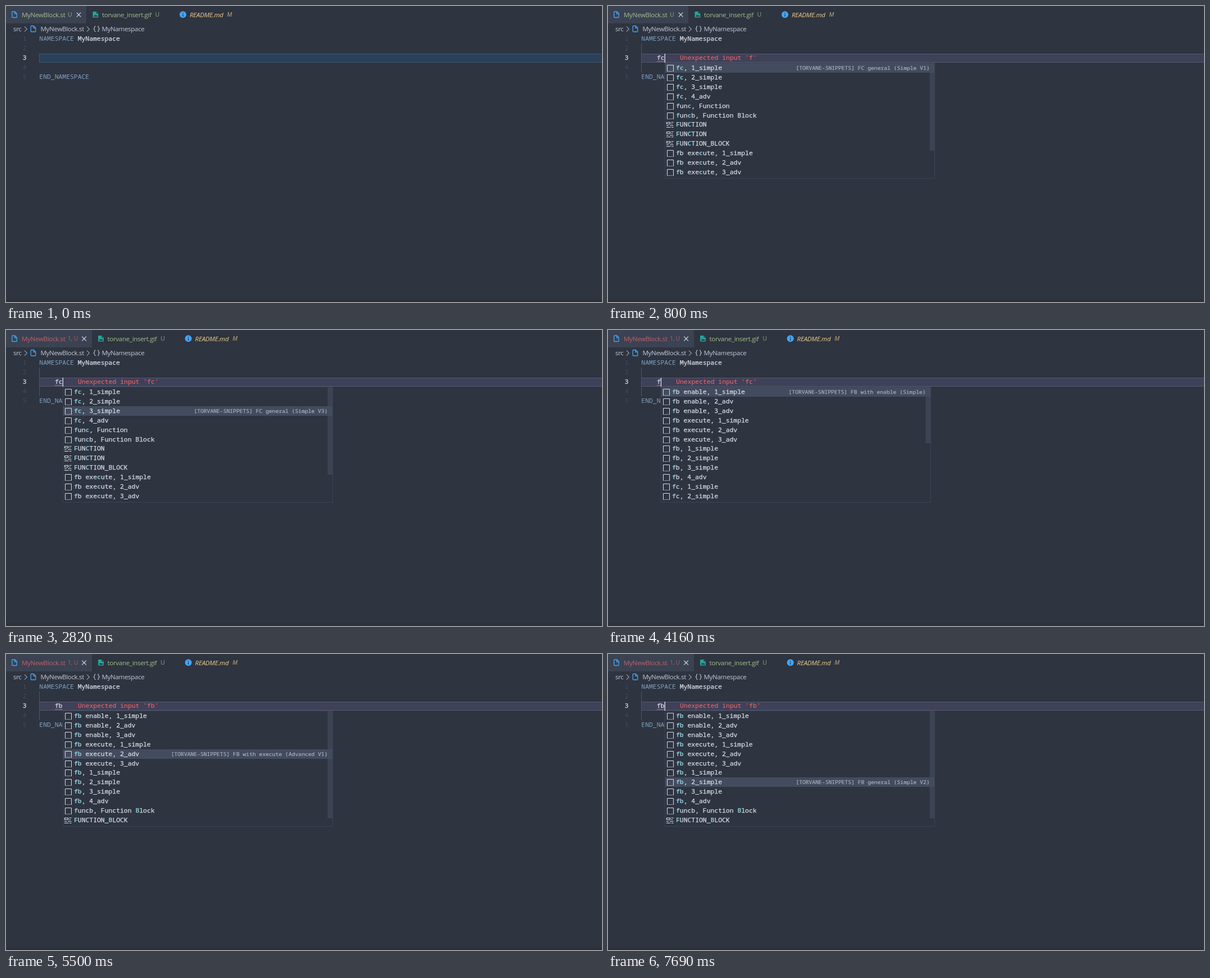
Animation, 1061 px wide and 528 px high, one loop 8 s. Source, as an HTML page:

```html
<!DOCTYPE html>
<html lang="en">
<head>
<meta charset="utf-8">
<title>Snippet completion</title>
<style>
  html, body { margin: 0; width: 100%; height: 100%; overflow: hidden; background: #2e3440; }
  svg { display: block; width: 1061px; height: 528px; }
  text { white-space: pre; }
  .ui { font: 11.55px "Open Sans", "Noto Sans", sans-serif; letter-spacing: -.33px; }
  .ui .badge { font-size: 10.6px; opacity: .82; }
  .code { font: 11.4px "Noto Sans Mono", "DejaVu Sans Mono", monospace; }
  .kw { fill: #81a1c1; }
  .plain, #rows { fill: #d8dee9; }
  .plain, #rows text { stroke: #d8dee9; stroke-width: .25; }
  .num { fill: #434c5e; text-anchor: end; }
  .num.plain { fill: #d8dee9; }
  .green { fill: #a3be8c; }
  .yellow { fill: #ebcb8b; font-style: italic; letter-spacing: -.22px; }
  .crumb { fill: #c3cad6; }
  .line { fill: none; stroke: #d8dee9; }
  #rows .hit { fill: #88c0d0; stroke: none; font-weight: 700; }
  #detail { font-size: 9.7px; fill: #a9b1bf; stroke: #a9b1bf; stroke-width: .2; text-anchor: end; }
  #message { fill: #ff6464; }
  .red #title, .red #status { fill: #bf616a; }
</style>
</head>
<body>
<svg viewBox="0 0 1061 528">
  <defs>
    <path id="file" d="M.7 1.5q0-1 1-1h4l3.6 3.6v5.9q0 1-1 1h-6.6q-1 0-1-1zM5.5.7v3.6h3.6" fill="none" stroke="#42a5f5" stroke-width="1.3"/>
    <path id="chevron" d="M0 0l4.4 4.5l-4.4 4.5" class="line"/>
    <g id="snippet" class="line">
      <path d="M1.8 11.5H.5V.5h11v11h-1.3"/>
      <path d="M3 11.5h6.5" stroke-dasharray="1.3 1"/>
    </g>
    <path id="keyword" class="line" stroke-width="1.2" d="M.5 1.5h6v3h-6zM8.500 1.500h4M8.500 4.500h2.500M0 7.500h4M6 7.500h6.500M0 10.500h7.500M9 10.500h3.500"/>
  </defs>
  <rect width="1061" height="528" fill="#2e3440"/>
  <rect y="523" width="1061" height="5" fill="#2b303b"/>

  <g class="ui" id="tabs">
    <rect id="active" width="143" height="31" fill="#3b4252"/>
    <use href="#file" x="10" y="9.5"/>
    <text id="title" class="green" x="28" y="19.7">MyNewBlock.st</text>
    <text id="status" class="green badge" x="110" y="19.4">U</text>
    <g id="rest">
      <path d="M125.7 11.7l7.6 7.6m0-7.6l-7.6 7.6" class="line" stroke-width="1.2"/>
      <path d="M154.5 10h6.5l3.3 3.3v7.2h-9.8z" fill="#26a69a"/>
      <path d="M160.7 10.3v3.3h3.4M156 19l2.4-3.4l1.7 1.9l1.3-1.4l2 2.9z" fill="#2e3440"/>
      <text class="green" x="171" y="19.7">torvane_insert.gif</text>
      <text class="green badge" x="265.6" y="19.4">U</text>
      <circle cx="315" cy="15.3" r="6" fill="#42a5f5"/>
      <path d="M315 12v1.4m0 1.3v4" stroke="#2e3440" stroke-width="1.3"/>
      <text class="yellow" x="327" y="19.7">README.md</text>
      <text class="yellow badge" x="393.6" y="19.4">M</text>
    </g>
  </g>

  <g class="ui crumb">
    <text x="13" y="45.3">src</text>
    <use href="#chevron" x="33" y="36.7"/>
    <use href="#file" x="43.5" y="35"/>
    <text x="61.5" y="45.3">MyNewBlock.st</text>
    <use href="#chevron" x="144" y="36.7"/>
    <path class="line" d="M159.5 36q-2 0-2 2v1.5q0 1.3-1.6 1.3q1.6 0 1.6 1.3v1.5q0 2 2 2M163 36q2 0 2 2v1.5q0 1.3 1.6 1.3q-1.6 0-1.6 1.3v1.5q0 2-2 2"/>
    <text x="170.5" y="45.3">MyNamespace</text>
  </g>

  <rect id="band" x="59.5" y="85.5" width="1010" height="15"/>
  <path id="guide" d="M59.5 67v51" stroke="#4c566a"/>
  <g class="code">
    <g id="numbers"></g>
    <text class="kw" x="59.3" y="62.4">NAMESPACE <tspan class="plain">MyNamespace</tspan></text>
    <text class="kw" x="59.3" y="130">END_NAMESPACE</text>
    <text class="plain" id="typed" x="86.9" y="96.2"></text>
    <path id="wave" fill="none" stroke="#d0626b"/>
    <text id="message" y="96.2"></text>
    <rect id="cursor" y="85" width="1.2" height="16" fill="#eceff4"/>
    <g id="popup">
      <rect x=".5" y="101.5" width="480" height="206" fill="#2e3440" stroke="#3b4252"/>
      <rect id="pick" x="1" width="479" height="17" fill="#434c5e"/>
      <g id="rows"></g>
      <text id="detail" x="471.7"></text>
      <rect id="slider" x="471.5" y="102" width="9" fill="#434c5e" fill-opacity=".67"/>
    </g>
  </g>
</svg>
<script>
const LOOP = 8000, ADVANCE = 6.84;
const $ = id => document.getElementById(id);
const set = (id, attrs) => {
  for (const key in attrs) $(id).setAttribute(key, attrs[key]);
};
const show = (id, on) => set(id, { visibility: on ? 'visible' : 'hidden' });

const series = (name, ...kinds) => kinds.map((kind, i) => `${name}${i + 1}_${kind}`);
const enable = series('fb enable, ', 'simple', 'adv', 'adv');
const execute = series('fb execute, ', 'simple', 'adv', 'adv');
const general = name => series(name + ', ', 'simple', 'simple', 'simple', 'adv');
const fbItems = [...enable, ...execute, ...general('fb')];

const lists = {
  f: { slider: 100, items: [...fbItems, ...general('fc').slice(0, 2)] },
  fc: {
    slider: 156,
    items: [...general('fc'), 'func, Function', 'funcb, Function Block',
      'FUNCTION', 'FUNCTION', 'FUNCTION_BLOCK', ...execute]
  },
  fb: { slider: 191, items: [...fbItems, 'funcb, Function Block', 'FUNCTION_BLOCK'] }
};

// Each step changes only the listed parts of the state.
const steps = [
  [0, { typed: '', list: '', pick: 0, error: '', red: false, cursor: false }],
  [140, { cursor: true }],
  [460, { typed: 'f' }],
  [600, { list: 'f' }],
  [740, { typed: 'fc', list: 'fc' }],
  [800, { error: 'f' }],
  [860, { red: true }],
  [1200, { error: 'fc', cursor: false }],
  [1740, { cursor: true }],
  [1800, { pick: 1 }],
  [2220, { cursor: false }],
  [2740, { cursor: true }],
  [2820, { pick: 2 }],
  [3220, { cursor: false }],
  [3760, { cursor: true }],
  [4160, { typed: 'f', list: 'f', pick: 0 }],
  [4620, { error: 'f', cursor: false }],
  [4760, { typed: 'fb', list: 'fb', cursor: true }],
  [5160, { pick: 1 }],
  [5220, { pick: 2, error: 'fb', cursor: false }],
  [5360, { pick: 3 }],
  [5500, { pick: 4 }],
  [5620, { pick: 5 }],
  [5700, { cursor: true }],
  [5760, { pick: 6 }],
  [6210, { cursor: false }],
  [6750, { cursor: true }],
  [6890, { pick: 7 }],
  [7210, { cursor: false }],
  [7690, { cursor: true }]
];

const rowTop = i => 102 + Math.round(16.9 * i);

function highlight(text, query) {
  const hits = [0];
  if (query[1]) {
    const letter = query[1];
    const word = text.search(new RegExp('[ _]' + letter.toUpperCase())) + 1;
    hits.push(text.startsWith(query) ? 1 : word || text.toLowerCase().indexOf(letter));
  }
  return [...text].map((c, i) => hits.includes(i) ? `<tspan class="hit">${c}</tspan>` : c).join('');
}

function row(text, i, query) {
  const icon = /^F/.test(text) ? 'keyword' : 'snippet';
  const y = rowTop(i);
  return `<use href="#${icon}" x="${icon === 'keyword' ? 3 : 4}" y="${y + 3}"/>` +
    `<text x="20" y="${y + 12.3}">${highlight(text, query)}</text>`;
}

function detail(item) {
  const [, name, n, kind] = item.match(/^(.*), (\d)_(.*)$/);
  const [block, use] = name.split(' ');
  const version = !use ? ` V${n}` : n > 1 ? ` V${n - 1}` : '';
  const level = kind === 'adv' ? 'Advanced' : 'Simple';
  return `[TORVANE-SNIPPETS] ${block.toUpperCase()} ${use ? 'with ' + use : 'general'} (${level}${version})`;
}

function drawPopup({ list, pick, typed }) {
  show('popup', list);
  if (!list) return;
  const { items, slider } = lists[list];
  set('popup', { transform: `translate(${Math.round(87 + ADVANCE * typed.length)} 0)` });
  $('rows').innerHTML = items.map((text, i) => row(text, i, list)).join('');
  set('pick', { y: rowTop(pick) });
  set('detail', { y: rowTop(pick) + 12 });
  $('detail').textContent = detail(items[pick]);
  set('slider', { height: slider });
}

function draw(state) {
  const { typed, error, red, cursor } = state;
  const end = 87 + ADVANCE * typed.length;
  $('typed').textContent = typed;
  show('guide', typed);
  show('cursor', cursor);
  set('cursor', { x: end });
  set('band', error ? { fill: '#3f4159', stroke: '#55576f' } : { fill: '#2a4159', stroke: '#3c5871' });

  $('message').textContent = error && `Unexpected input '${error}'`;
  set('message', { x: end + 4 * ADVANCE });
  show('wave', error);
  set('wave', { d: 'M87 100' + 'l1.7 -2l1.7 2'.repeat(typed.length * 2) });

  set('tabs', { class: red ? 'ui red' : 'ui' });
  set('active', { width: red ? 153 : 143 });
  set('rest', { transform: `translate(${red ? 9.6 : 0} 0)` });
  $('status').textContent = red ? '1, U' : 'U';
  drawPopup(state);
}

$('numbers').innerHTML = [1, 2, 3, 4, 5].map(n =>
  `<text class="num${n === 3 ? ' plain' : ''}" x="36.7" y="${62.4 + 16.9 * (n - 1)}">${n}</text>`
).join('');

let shown = -1;
function tick() {
  const now = performance.now() % LOOP;
  const count = steps.filter(([at]) => at <= now).length;
  if (count !== shown) {
    shown = count;
    draw(Object.assign({}, ...steps.slice(0, count).map(step => step[1])));
  }
  requestAnimationFrame(tick);
}
tick();
</script>
</body>
</html>
```
